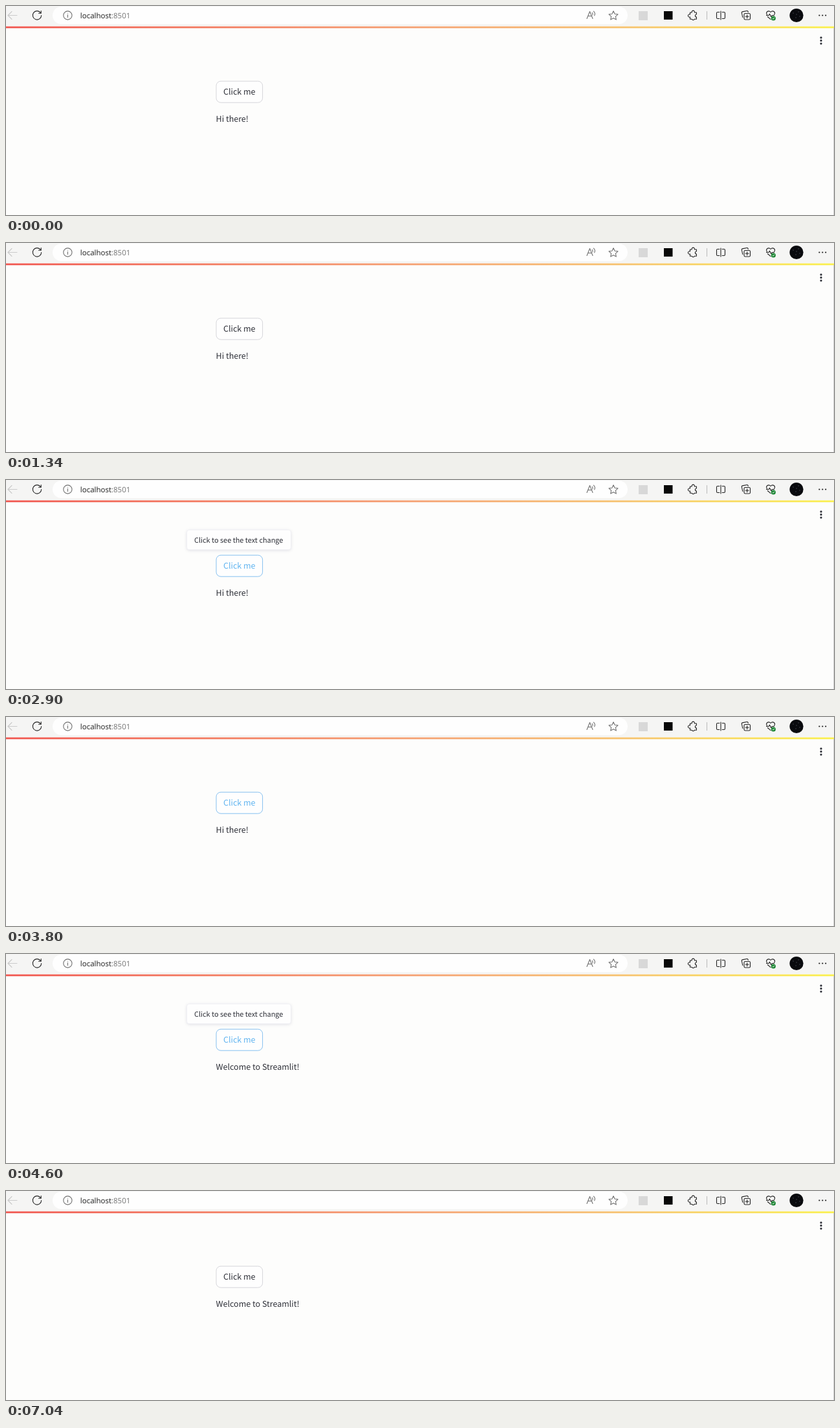
Animation, 1280 px wide and 323 px high, one loop 7.21 s. Source, as an HTML page:

```html
<!DOCTYPE html>
<html lang="en">
<head>
<meta charset="utf-8">
<title>Button with tooltip</title>
<style>
  html, body { margin: 0; width: 100%; height: 100%; overflow: hidden; background: #fdfdfc; }
  svg { display: block; width: 100%; height: 100%; }
  text { text-rendering: geometricPrecision; }
  .page { font: 12.5px "Noto Sans CJK JP", "Noto Sans CJK SC", "Noto Sans CJK", "Noto Sans", sans-serif; fill: #2e3038; }
  .address { font: 11.5px "Open Sans", "Noto Sans", sans-serif; fill: #1c1c1c; }
  .icon { fill: none; stroke: #222; stroke-width: 1.1; stroke-linecap: round; stroke-linejoin: round; }
  .muted { stroke: #707070; }
  #tip rect { filter: drop-shadow(0 1px 2px rgba(40, 40, 80, .13)); }
  #tip text { font-size: 10.9px; }
</style>
</head>
<body>
<svg viewBox="0 0 1280 323" preserveAspectRatio="none">
  <defs>
    <linearGradient id="rainbow">
      <stop offset="0" stop-color="#f0564f"/>
      <stop offset=".5" stop-color="#f5a273"/>
      <stop offset=".75" stop-color="#f6c36f"/>
      <stop offset="1" stop-color="#faf04e"/>
    </linearGradient>
  </defs>

  <!-- browser toolbar -->
  <rect width="1280" height="323" fill="#fdfdfc"/>
  <rect width="1280" height="31" fill="#f5f5f4"/>
  <rect x="72" y="1" width="889" height="27" rx="13.5" fill="#fefefe"/>
  <path class="icon" style="stroke:#cbcbcb" d="M17 14.5H3M9 8.5l-6 6 6 6"/>
  <path class="icon" stroke-width="1.3" d="M53.4 10.4A6.7 6.7 0 1 0 54.7 14.5M54.2 7.6v3.6h-3.7"/>
  <g class="icon muted">
    <circle cx="95.4" cy="14.5" r="6.6"/>
    <path d="M95.4 13.6v4M95.4 11.2v.1"/>
    <path d="M898 19.5l4.5-11 4.5 11M899.7 15.5h5.7M906.2 10.3q1.5 1.7 .5 3.7M908.4 8.2q3.2 3 1.3 6.6"/>
    <path d="M939 7.7l2.1 4.5 4.9.6-3.6 3.4.9 4.9-4.3-2.4-4.3 2.4.9-4.9-3.6-3.4 4.9-.6z"/>
  </g>
  <text class="address" x="114.8" y="18.7">localhost<tspan fill="#747474">:8501</tspan></text>
  <rect x="978" y="8" width="14" height="14" fill="#d8d8d8"/>
  <rect x="1017" y="8" width="13.5" height="13" fill="#080808"/>
  <g class="icon">
    <path d="M1057.5 10h2.7a2.2 2.2 0 1 1 4.2 0h3v3a2 2 0 0 0 0 4v3.2h-3a2.2 2.2 0 0 1-4.2 0h-2.7V17a2.2 2.2 0 1 1 0-4z"/>
    <path stroke="#bdbdbd" style="stroke:#bdbdbd" d="M1083.5 8.5v12"/>
    <path d="M1102.8 9.5h-2.8q-1.5 0-1.5 1.5v7q0 1.5 1.5 1.5h2.8M1107.2 9.5h2.8q1.5 0 1.5 1.5v7q0 1.5-1.5 1.5h-2.8M1105 8v13"/>
    <rect x="1141" y="11.5" width="9.5" height="9.5" rx="1.8"/>
    <path d="M1145.7 13.8v5M1143.2 16.3h5M1138.8 17.5l-1.5-7q-.2-1.3 1.1-1.6l7-1.4q1.3-.2 1.6 1l.3 1"/>
    <path d="M1176.5 13.5q-2-3 .5-5 2.7-1.6 5 1 2.4-2.6 5.1-1 2.5 2 .5 5M1175.5 14.5h3.5l1.5-2.3 2.3 4.6 1.5-2.3h3M1177.3 16.5l4.7 4.2"/>
  </g>
  <circle cx="1186.3" cy="19" r="3.6" fill="#218838"/>
  <path d="M1184.6 19l1.2 1.2 2.2-2.4" fill="none" stroke="#fff" stroke-width=".9"/>
  <circle cx="1222" cy="14.5" r="10.6" fill="#090a0e"/>
  <path d="M1217 11h.1M1225 9h.1M1221 18h.1M1227 16h.1M1222 13h.1" stroke="#777986" stroke-linecap="round"/>
  <path d="M1257.3 14.5h.1M1262.2 14.5h.1M1267.1 14.5h.1" stroke="#222" stroke-width="2.2" stroke-linecap="round"/>

  <!-- page -->
  <rect y="31.5" width="1280" height="2.8" fill="url(#rainbow)"/>
  <path d="M1279.5 34v289" stroke="#d4d4d4"/>
  <path d="M1260 48.8v.1M1260 53.4v.1M1260 58v.1" stroke="#2e3038" stroke-width="3.2" stroke-linecap="round"/>
  <g class="page">
    <rect id="frame" x="325" y="116.2" width="71.6" height="33" rx="7" fill="#fefefe"/>
    <text id="label" x="336" y="137.3">Click me</text>
    <text id="message" x="324.6" y="179.3"></text>
    <g id="tip">
      <rect x="279.5" y="77.2" width="161" height="30.6" rx="4" fill="#fefefe" stroke="#efeff4" stroke-width=".8"/>
      <text x="291" y="97">Click to see the text change</text>
    </g>
  </g>
</svg>
<script>
  const LOOP = 7210;
  const [frame, label, message, tip] =
    ["frame", "label", "message", "tip"].map(id => document.getElementById(id));

  const ramp = (t, start, end) => Math.min(1, Math.max(0, (t - start) / (end - start)));
  const within = (t, start, end) => t >= start && t < end;

  function draw(t) {
    // The second highlight outlasts the tooltip because the clicked button keeps focus.
    const active = within(t, 2000, 3170) || within(t, 3670, 6980);
    frame.setAttribute("stroke", active ? "#86c0f0" : "#d6d6da");
    label.setAttribute("fill", active ? "#60b4f0" : "#2e3038");
    message.textContent = t < 4300 ? "Hi there!" : "Welcome to Streamlit!";
    tip.setAttribute("opacity",
      ramp(t, 2270, 2470) - ramp(t, 3240, 3370) + ramp(t, 3970, 4170) - ramp(t, 4930, 5070));
  }

  const begin = performance.now();
  function tick() {
    draw((performance.now() - begin) % LOOP);
    requestAnimationFrame(tick);
  }
  tick();
</script>
</body>
</html>
```
